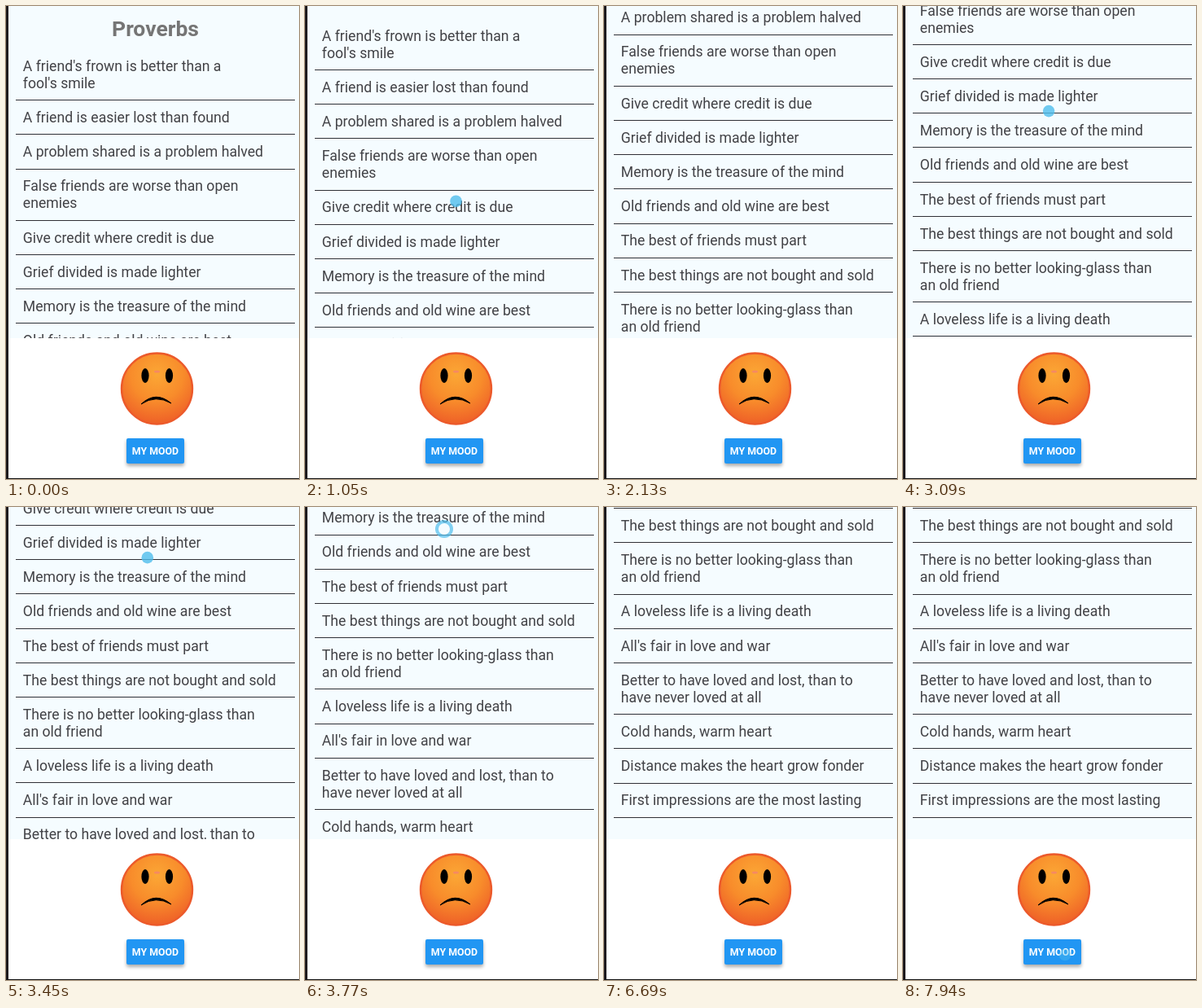
An HTML page for the animation above (7990 ms loop, 360 by 581 pixels).

```html
<!DOCTYPE html>
<html lang="en">
<head>
<meta charset="utf-8">
<title>Proverbs</title>
<style>
  html, body { margin: 0; width: 100%; height: 100%; overflow: hidden; background: #fff; }
  body { position: relative; font-family: Roboto, sans-serif; }
  #view { position: absolute; left: 3px; top: 0; right: 0; height: 408px; overflow: hidden; background: #f5fcff; }
  #list { position: absolute; left: 9px; width: 343px; }
  h1 { margin: 0; height: 53px; font: bold 26.5px/55px Roboto, sans-serif; text-align: center; color: #757575; }
  p { margin: 0; padding: 10.9px 8.8px 9.3px; border-bottom: 1px solid #303036; font-size: 17.65px; line-height: 21px; white-space: pre; color: #424246; }
  #edge { position: absolute; inset: 0; border-left: 3px solid #1d1a1d; border-bottom: 1px solid #111; }
  #button { position: absolute; left: 148px; top: 531px; width: 71px; height: 31px; border-radius: 2px; background: #2196f3;
    color: #fff; font-weight: bold; font-size: 12.36px; line-height: 33px; text-align: center; box-shadow: 0 3px 4px #0005; }
  svg { position: absolute; left: 0; top: 0; }
</style>
</head>
<body>
<div id="view"><div id="list"><h1>Proverbs</h1></div></div>
<div id="edge"></div>
<div id="button">MY MOOD</div>
<svg width="360" height="581">
  <defs>
    <radialGradient id="skin" cx=".5" cy=".3" r=".74">
      <stop offset="0" stop-color="#fba735"/>
      <stop offset=".5" stop-color="#f88c2b"/>
      <stop offset="1" stop-color="#ed5a27"/>
    </radialGradient>
  </defs>
  <circle cx="185.5" cy="470" r="43.5" fill="url(#skin)" stroke="#ec5a2b" stroke-width="2.4"/>
  <ellipse cx="171" cy="454" rx="4.6" ry="9"/>
  <ellipse cx="200.5" cy="454" rx="4.6" ry="9"/>
  <ellipse cx="185.5" cy="449" rx="3.5" ry="1.5" fill="#f58a62"/>
  <path d="M166 489Q184 472 203 488Q184 477 166 489Z" stroke="#000" stroke-linejoin="round"/>
  <circle id="touch"/>
</svg>
<script>
const LOOP = 7990;
const proverbs = [
  "A friend's frown is better than a\nfool's smile",
  "A friend is easier lost than found",
  "A problem shared is a problem halved",
  "False friends are worse than open\nenemies",
  "Give credit where credit is due",
  "Grief divided is made lighter",
  "Memory is the treasure of the mind",
  "Old friends and old wine are best",
  "The best of friends must part",
  "The best things are not bought and sold",
  "There is no better looking-glass than\nan old friend",
  "A loveless life is a living death",
  "All's fair in love and war",
  "Better to have loved and lost, than to\nhave never loved at all",
  "Cold hands, warm heart",
  "Distance makes the heart grow fonder",
  "First impressions are the most lasting"
];

// [time, scroll offset]
const scrollKeys = [
  [0, 0], [760, 0], [900, 12], [1490, 110.7], [1800, 150], [1950, 160], [2130, 165],
  [2740, 165], [2850, 176], [3090, 215.7], [3640, 318], [3770, 355.6], [3860, 369], [3960, 375],
  [4630, 375], [4830, 429], [5020, 458], [5200, 469], [5370, 472.5], [LOOP, 472.5]
];

// anchor: finger y plus scroll offset while dragging
const touches = [
  { down: 690, up: 1850, x0: 188, x1: 180, anchor: 277 },
  { down: 2690, up: 3640, x0: 185, x1: 171, anchor: 345 },
  { down: 4610, up: 5370, x0: 194, x1: 190, anchor: 641.5 },
  { down: 6680, up: 6860, x0: 200, x1: 200, y: 547 },
  { down: 7250, up: 7430, x0: 199, x1: 199, y: 550 },
  { down: 7890, up: LOOP, x0: 199, x1: 199, y: 550 }
];

const list = document.getElementById("list");
const touch = document.getElementById("touch");
for (const text of proverbs) list.append(Object.assign(document.createElement("p"), { textContent: text }));

const mix = (a, b, k) => a + (b - a) * k;

function scrollAt(t) {
  const i = scrollKeys.findIndex(key => key[0] > t);
  const [t0, a] = scrollKeys[i - 1], [t1, b] = scrollKeys[i];
  return mix(a, b, (t - t0) / (t1 - t0));
}

function drawTouch(t) {
  const hit = touches.find(h => t >= h.down && t < h.up + 260);
  touch.style.display = hit ? "" : "none";
  if (!hit) return;
  const held = Math.min(t, hit.up);
  const release = Math.max(0, t - hit.up) / 260;
  const attrs = {
    cx: mix(hit.x0, hit.x1, (held - hit.down) / (hit.up - hit.down)),
    cy: hit.y ?? hit.anchor - scrollAt(held),
    r: release ? mix(5, 13, release) : 7.3,
    fill: release ? "none" : "#4fbdec",
    stroke: "#4fbdec",
    "stroke-width": release ? mix(7, 1, release) : 0,
    opacity: 0.8 * Math.min(1, (t - hit.down) / 100) * (1 - release ** 3)
  };
  for (const name in attrs) touch.setAttribute(name, attrs[name]);
}

function draw() {
  const t = performance.now() % LOOP;
  list.style.top = -scrollAt(t) + "px";
  drawTouch(t);
  requestAnimationFrame(draw);
}
draw();
</script>
</body>
</html>
```
